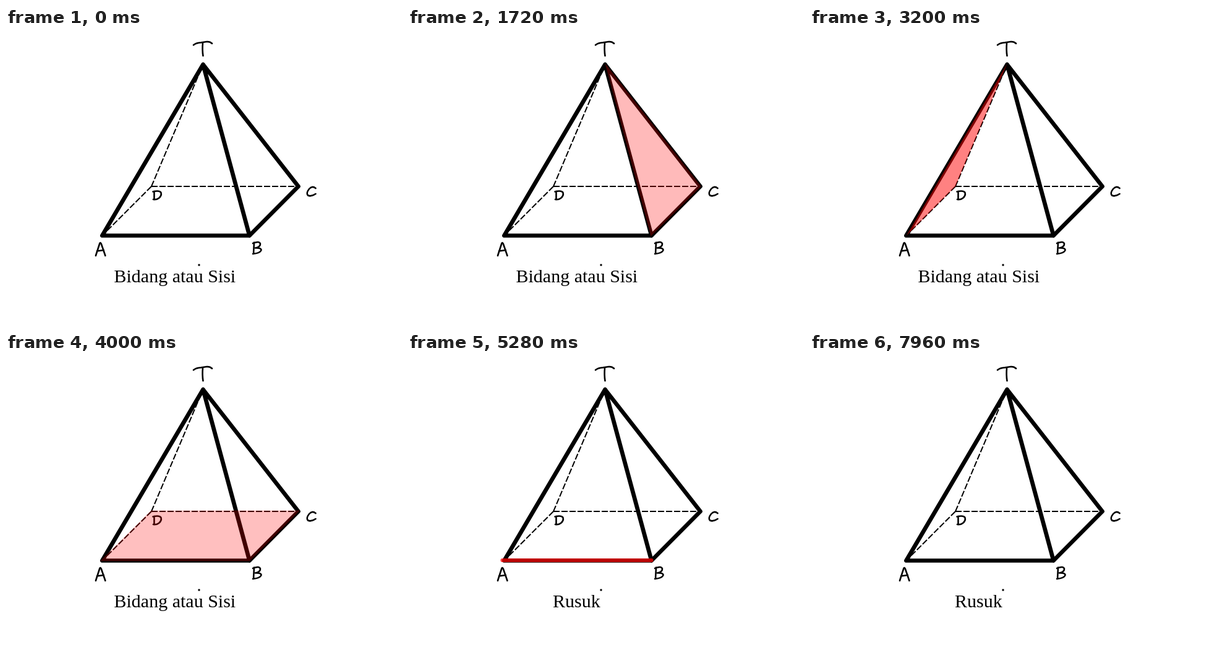
Recreate the animation shown at these times as an HTML page with a canvas. Size 640 by 480 pixels, loop 8000 ms.

```html
<!DOCTYPE html>
<html lang="id">
<head>
<meta charset="utf-8">
<title>Limas segi empat</title>
<style>
  html, body { margin: 0; width: 100%; height: 100%; overflow: hidden; background: #fff; }
  canvas { display: block; width: 640px; height: 480px; }
</style>
</head>
<body>
<canvas id="stage" width="640" height="480"></canvas>
<script>
const ctx = document.getElementById('stage').getContext('2d');
const LOOP = 8000, STEP = 40;
const FACE_FADE = 360, EDGE_FADE = 400, FACE_ALPHA = 0.5;

const T = [318.5, 59], A = [155.5, 335.5], B = [393.5, 335.5];
const C = [472.5, 256], D = [235, 256];

// Each part has the moments when it begins to appear and to vanish.
const faces = [
  { pts: [[318.5, 57], [154, 336.5], [392.5, 336.5]], on: 30, off: 590 },
  { pts: [[318.5, 57], [392.5, 336.5], [473.5, 256]], on: 980, off: 1550 },
  { pts: [[318.5, 58], [235, 256], [473.5, 256]], on: 1940, off: 2470 },
  { pts: [[318.5, 58], [235, 256], [156, 335.5]], on: 2860, off: 3430 },
  { pts: [[152, 336.5], [393.5, 336.5], [475, 254.5], [234.5, 254.5]], on: 3820, off: 4390 }
];
const edges = [
  { pts: [[152.5, 335], [393.5, 335]], on: 4985, off: 5530 },
  { pts: [[394, 335], [472.5, 256]], on: 5945, off: 6530 },
  { pts: [[234.5, 255], [472.5, 255]], on: 6970, off: 7530 }
];

const letters = [
  'M303 27.5 Q307 24 315 23.5 L325 22 Q330 22 333 25 M318 24 Q317 36 318.5 45',
  'M145 368 L151.5 348 Q152.5 346 154 349 L160.5 368 M147 360.5 L158 359',
  'M401 346.5 L400 365 M399 348 Q410 343.5 411 349 Q411 354 403 355.5 Q412.5 355 412.5 359 Q411 364 399 365',
  'M500.5 259 Q495 254.5 490 260 Q484.5 267 488 270.5 Q493 273 500.5 268',
  'M239.5 264 L239.5 277 M237.5 264.5 Q248 262 250.5 266 Q252 271 247 275 Q243 278 238 277'
].map(d => new Path2D(d));

const clamp = v => Math.max(0, Math.min(1, v));
const ramp = (t, start, span) => clamp((t - start) / span);
const smooth = p => p * p * (3 - 2 * p);
const shown = (t, part, span) => ramp(t, part.on, span) - ramp(t, part.off, span);

function trace(pts) {
  ctx.beginPath();
  pts.forEach(p => ctx.lineTo(p[0], p[1]));
}

function line(pts, width, color, dash = []) {
  ctx.lineWidth = width;
  ctx.strokeStyle = color;
  ctx.setLineDash(dash);
  trace(pts);
  ctx.stroke();
  ctx.setLineDash([]);
}

function pyramid() {
  ctx.lineCap = 'butt';
  [[D, T], [D, C], [D, A]].forEach(p => line(p, 2, '#000', [10, 3]));
  ctx.lineCap = ctx.lineJoin = 'round';
  line([T, A, B, C, T, B], 6.7, '#000');
  ctx.lineWidth = 2.6;
  letters.forEach(path => ctx.stroke(path));
  ctx.fillStyle = '#000';
  ctx.beginPath();
  ctx.arc(312, 383, 1.7, 0, Math.PI * 2);
  ctx.fill();
}

function draw(t) {
  ctx.fillStyle = '#fff';
  ctx.fillRect(0, 0, 640, 480);
  pyramid();

  ctx.font = '30px "Liberation Serif", "Times New Roman", serif';
  if (t < 4400) ctx.fillText('Bidang atau Sisi', 174.5, 411);
  if (t >= 5000) ctx.fillText('Rusuk', 234, 411);

  ctx.fillStyle = '#f00';
  for (const face of faces) {
    ctx.globalAlpha = FACE_ALPHA * smooth(shown(t, face, FACE_FADE));
    trace(face.pts);
    ctx.fill();
  }
  for (const edge of edges) {
    ctx.globalAlpha = shown(t, edge, EDGE_FADE);
    line(edge.pts, 6, '#f00');
  }
  ctx.globalAlpha = 1;
}

const begin = performance.now();
function tick() {
  const t = (performance.now() - begin) % LOOP;
  draw(Math.floor(t / STEP) * STEP);
  requestAnimationFrame(tick);
}
tick();
</script>
</body>
</html>
```
